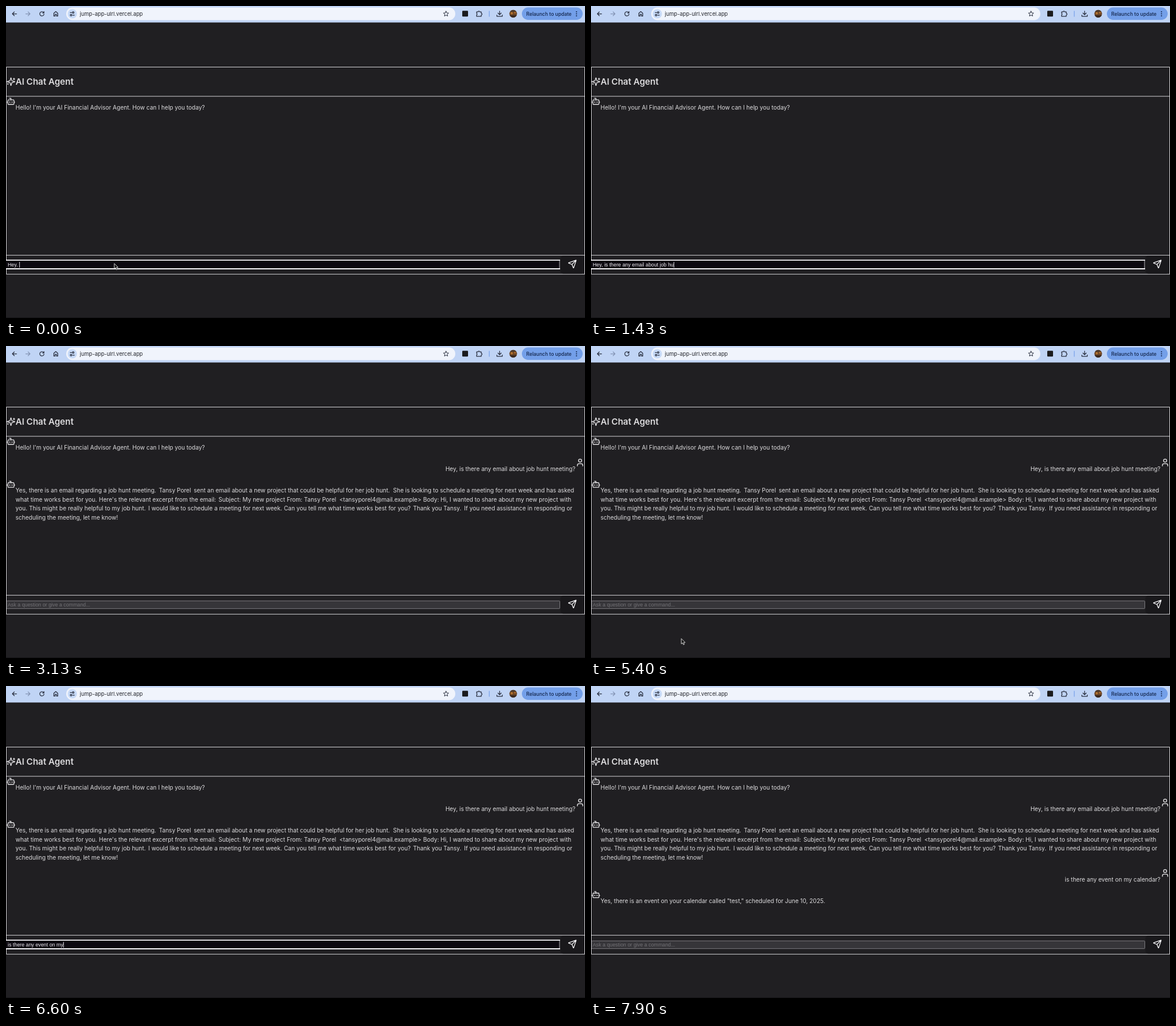
Recreate the animation shown at these times as an HTML page. Size 1000x539 px, loop 8 s.

```html
<!DOCTYPE html>
<html lang="en">
<head>
<meta charset="utf-8">
<title>AI Chat Agent</title>
<style>
  html, body { margin: 0; width: 100%; height: 100%; overflow: hidden; background: #201f22; }
  svg { display: block; width: 100%; height: 100%; }
  text { font-family: Inter, "Open Sans", sans-serif; font-size: 10.05px; fill: #dddcde; white-space: pre; }
  .field { font-family: "Liberation Sans", Arial, sans-serif; font-size: 8.8px; }
  .icon { fill: none; stroke: #e6e5e7; stroke-width: 2; stroke-linecap: round; stroke-linejoin: round; }
  .bar { fill: none; stroke: #2a3040; stroke-width: 1.25; stroke-linecap: round; stroke-linejoin: round; }
</style>
</head>
<body>
<svg viewBox="0 0 1000 539">
  <defs>
    <g id="bot" class="icon">
      <path d="M12 8V4H8M2 14h2M20 14h2M15 13v2M9 13v2"/>
      <rect x="4" y="8" width="16" height="12" rx="2"/>
    </g>
    <g id="user" class="icon">
      <path d="M19 21v-2a4 4 0 0 0-4-4H9a4 4 0 0 0-4 4v2"/>
      <circle cx="12" cy="7" r="4"/>
    </g>
    <clipPath id="face"><circle cx="876" cy="13.3" r="6.6"/></clipPath>
  </defs>

  <rect width="1000" height="539" fill="#201f22"/>
  <rect y="538" width="1000" height="1" fill="#151417"/>

  <!-- browser toolbar -->
  <rect width="1000" height="28.5" fill="#c0d4f5"/>
  <rect x="104" y="2.5" width="672" height="22" rx="11" fill="#f0f4fc"/>
  <circle cx="114.5" cy="13.5" r="8" fill="#c7daf7"/>
  <g class="bar">
    <path d="M18.3 13.5H11M14.3 10.2L11 13.5l3.3 3.3"/>
    <path d="M34.2 13.5h7.3M38.2 10.2l3.3 3.3-3.3 3.3" stroke="#8495b5"/>
    <path d="M65 11.2A3.7 3.7 0 1 0 65.7 14.2M65.6 9.6v2.4h-2.4"/>
    <path d="M82.6 12.4L86 9.6l3.4 2.8v5H87.2v-3h-2.4v3H82.6z"/>
    <path d="M111 11.3h2.2M115.3 15.8h2.8"/>
    <circle cx="116" cy="11.3" r="1.4"/><circle cx="112.4" cy="15.8" r="1.4"/>
    <path d="M760 9l1.3 2.9 3.2.3-2.4 2.1.7 3.1-2.8-1.6-2.8 1.6.7-3.1-2.4-2.1 3.2-.3z" stroke-width="1"/>
    <path d="M812.8 10.2h2.5a1.4 1.4 0 0 1 2.8 0h2.7v2.5a1.4 1.4 0 0 1 0 2.8v2.4h-8v-2.6a1.4 1.4 0 0 0 0-2.6z"/>
    <path d="M852.5 8.8v6M849.7 12.2l2.8 2.8 2.8-2.8M847.8 15.5v2.3h9.4v-2.3"/>
  </g>
  <rect x="788" y="8.3" width="10" height="10" rx="1.2" fill="#1b1b1d"/>
  <rect x="834" y="8.5" width="1.2" height="10" fill="#7ba2ea"/>
  <g clip-path="url(#face)">
    <rect x="869" y="6" width="14" height="15" fill="#6b4526"/>
    <rect x="869" y="6" width="14" height="4" fill="#4d3a2b"/>
    <circle cx="873.5" cy="12.5" r="2" fill="#b5752f"/>
    <circle cx="879" cy="11.5" r="1.7" fill="#a7682b"/>
    <rect x="869" y="16" width="14" height="4" fill="#3b2a20"/>
  </g>
  <rect x="891" y="2.5" width="105" height="21.5" rx="10.75" fill="#739fe9"/>
  <text x="127.5" y="17" style="font-size:9.28px;fill:#25272d">jump-app-ulrl.vercel.app</text>
  <text x="898.5" y="16.6" style="font-size:8.5px;font-weight:500;fill:#122449">Relaunch to update</text>
  <g fill="#122449">
    <circle cx="985.3" cy="9.9" r="1"/><circle cx="985.3" cy="13.4" r="1"/><circle cx="985.3" cy="16.9" r="1"/>
  </g>

  <!-- chat panel -->
  <path d="M.5 105.5H999.5V463.3H.5zM.5 156H999.5M.5 430.6H999.5" fill="none" stroke="#d3d2d5"/>
  <g class="icon" transform="translate(.6 122.8) scale(.66)">
    <path d="M9.937 15.5A2 2 0 0 0 8.5 14.063l-6.135-1.582a.5.5 0 0 1 0-.962L8.5 9.936A2 2 0 0 0 9.937 8.5l1.582-6.135a.5.5 0 0 1 .963 0L14.063 8.5A2 2 0 0 0 15.5 9.937l6.135 1.581a.5.5 0 0 1 0 .964L15.5 14.063a2 2 0 0 0-1.437 1.437l-1.582 6.135a.5.5 0 0 1-.963 0zM20 3v4M22 5h-4M4 17v2M5 18H3"/>
  </g>
  <text x="16.5" y="136.4" style="font-size:15px;font-weight:600">AI Chat Agent</text>
  <g id="chat"></g>

  <!-- input row -->
  <rect x="957.5" y="431.4" width="41.4" height="31" rx="5" fill="#19181b"/>
  <g id="send" class="icon" transform="translate(970.2 437.9) scale(.66)">
    <path d="M14.536 21.686a.5.5 0 0 0 .937-.024l6.5-19a.496.496 0 0 0-.635-.635l-19 6.5a.5.5 0 0 0-.024.937l7.93 3.18a2 2 0 0 1 1.112 1.11zM21.854 2.147l-10.94 10.939"/>
  </g>
  <rect id="idle" x="1" y="440.3" width="955.5" height="13.4" rx="1" fill="#363539"/>
  <g id="focus">
    <rect y="439" width="956.5" height="15" fill="#0c0910"/>
    <path d="M956 439v15" stroke="#b5b4b8"/>
    <path d="M0 439.1H957M0 454H957" stroke="#f4f3f6" stroke-width="1.9"/>
  </g>
  <text id="entry" class="field" x="3" y="449.8"></text>
  <rect id="caret" y="442" width=".9" height="10" fill="#f4f3f6"/>
  <path id="mouse" d="M0 0V9.2L2.1 7.3 3.6 10.6 5.2 9.9 3.8 6.7H6.6z" fill="#111" stroke="#e8e8e8" stroke-width=".9" stroke-linejoin="round"/>
</svg>
<script>
const LOOP = 8000;
const QUESTION = "Hey, is there any email about job hunt meeting?";
const FOLLOWUP = "is there any event on my calendar?";
const HINT = "Ask a question or give a command...";
const ASK1 = 2050, REPLY1 = 3030, CLICK = 5600, ASK2 = 7100, REPLY2 = 7830;

const $ = id => document.getElementById(id);
const pen = document.createElement("canvas").getContext("2d");
pen.font = '8.8px "Liberation Sans", Arial, sans-serif';

const esc = s => s.replace(/&/g, "&amp;").replace(/</g, "&lt;");
const label = (x, y, s, end) =>
  `<text x="${x}" y="${y}"${end ? ' text-anchor="end"' : ""}>${esc(s)}</text>`;
const icon = (name, x, y) =>
  `<use href="#${name}" transform="translate(${x} ${y}) scale(.66)"/>`;
const bot = y => icon("bot", 0.6, y);
const asked = (y, s) => icon("user", 983.6, y - 22.4) + label(983.5, y, s, true);

// Each row is a list of [x, phrase] pairs.
const rows = [
  [[16.5, "Yes, there is an email regarding a job hunt meeting."], [264, "Tansy Porel"],
   [324.3, "sent an email about a new project that could be helpful for her job hunt."],
   [668.5, "She is looking to schedule a meeting for next week and has asked"]],
  [[16.5, "what time works best for you."], [160.5, "Here's the relevant excerpt from the email:"],
   [367, "Subject: My new project"], [485, "From: Tansy Porel"], [575.7, "<tansyporel4@mail.example>"],
   [720.5, "Body:"], [750.5, "Hi, I wanted to share about my new project with"]],
  [[16.5, "you. This might be really helpful to my job hunt."],
   [245.8, "I would like to schedule a meeting for next week."],
   [480, "Can you tell me what time works best for you?"], [703, "Thank you Tansy."],
   [791.3, "If you need assistance in responding or"]],
  [[16.5, "scheduling the meeting, let me know!"]]
];
const reply = rows.map((row, i) =>
  row.map(([x, s]) => label(x, 252.7 + i * 15.85, s)).join("")).join("");

// Chat parts with the span of time in which each one shows.
const parts = [
  [0, LOOP, bot(156.8) + label(16.5, 178.8, "Hello! I'm your AI Financial Advisor Agent. How can I help you today?")],
  [ASK1, LOOP, asked(215.8, QUESTION) + bot(231)],
  [ASK1, REPLY1, label(16.5, 242.2, "Loading...")],
  [REPLY1, LOOP, reply],
  [ASK2, LOOP, asked(337.6, FOLLOWUP) + bot(352.5)],
  [ASK2, REPLY2, label(16.5, 364, "Loading...")],
  [REPLY2, LOOP, label(16.5, 374.7, 'Yes, there is an event on your calendar called "test," scheduled for June 10, 2025.')]
];
$("chat").innerHTML = parts.map(p => `<g>${p[2]}</g>`).join("");
const groups = [...$("chat").children];

const within = (t, a, b) => t >= a && t < b;
const show = (el, on) => el.setAttribute("visibility", on ? "visible" : "hidden");
const typed = (s, t, start, step) =>
  s.slice(0, Math.max(0, Math.floor((t - start) / step)));

function entryText(t) {
  if (t < 100) return "Hey. ";
  if (t < ASK1) return "Hey, " + typed(QUESTION.slice(5), t, 90, 42.5);
  return typed(FOLLOWUP, t, 5610, 41);
}

function mouseAt(t) {
  if (t < 100) return [187, 444.8];
  if (!within(t, 5000, 5660)) return null;
  const ease = u => u * u * (3 - 2 * u);
  const down = t < 5400;
  const u = ease(Math.min(1, down ? (t - 5000) / 380 : (t - 5400) / 180));
  return down ? [187 - 31 * u, 444.8 + 60.7 * u] : [156 + 4 * u, 505.5 - 61 * u];
}

function draw(t) {
  parts.forEach(([from, to], i) => groups[i].setAttribute("display", within(t, from, to) ? "inline" : "none"));

  const focused = t < ASK1 || within(t, CLICK, ASK2);
  const busy = within(t, ASK1, REPLY1) || within(t, ASK2, REPLY2);
  const value = focused ? entryText(t) : "";
  show($("focus"), focused);
  show($("idle"), !focused);
  show($("caret"), focused);
  $("idle").setAttribute("stroke", busy ? "#59585c" : "#858488");
  $("idle").setAttribute("stroke-width", ".9");
  $("send").style.stroke = busy ? "#77767a" : "#f4f3f6";
  $("entry").textContent = value || HINT;
  $("entry").style.fill = value ? "#efeef1" : "#737276";
  $("caret").setAttribute("x", 3 + pen.measureText(value).width);

  const at = mouseAt(t);
  show($("mouse"), at);
  if (at) $("mouse").setAttribute("transform", `translate(${at})`);
}

const begin = performance.now();
function tick() {
  draw((performance.now() - begin) % LOOP);
  requestAnimationFrame(tick);
}
tick();
</script>
</body>
</html>
```
